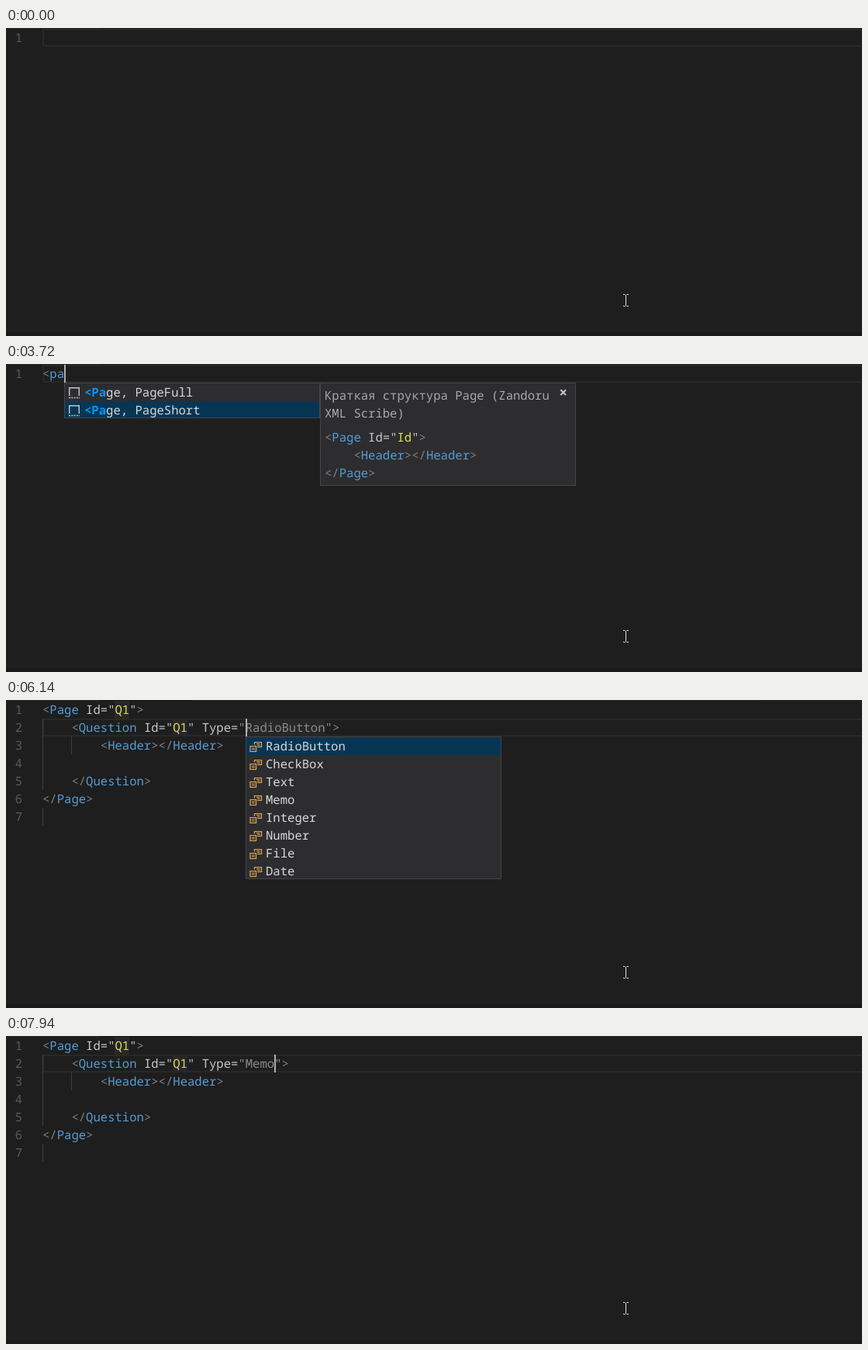
Write an HTML page that moves like this. It is 1104x397 px and loops after 8000 ms.

```html
<!DOCTYPE html>
<html lang="ru">
<head>
<meta charset="utf-8">
<title>XML completion</title>
<style>
html, body { margin: 0; width: 100%; height: 100%; overflow: hidden; background: #1e1e1e; }
body {
  position: relative;
  font: 15.58px/23px "Noto Sans Mono", monospace;
  text-rendering: geometricPrecision;
  font-variant-ligatures: none;
  color: #c8c8c8;
}
#stage div, #stage svg, .edge, #mouse { position: absolute; white-space: pre; box-sizing: border-box; }
.edge { left: 0; width: 100%; }
.top { top: 0; height: 1px; background: linear-gradient(90deg, #262626 120px, #1a1a1a 120px 240px, #262626 240px 975px, #222 975px); }
.bottom { bottom: 0; height: 5px; background: #1d181b; }
.number { left: 0; width: 21px; text-align: right; color: #5a5a5a; }
.current { right: -4px; height: 23px; border: 2px solid #282828; }
.guide { width: 1px; background: #404040; }
.caret { width: 2px; height: 23px; background: #aeafad; }
.second { background: #7d8388; }
.word { background: #3a3d41; }
.chosen { background: #29506f; }
.hint { background: #272727; }
.angle, .plain { color: #808080; }
.tag { color: #569cd6; }
.value { color: #dede59; }
.plain { color: #8c8c8c; }
.box { background: #2d2d30; border: 1px solid #454545; overflow: hidden; width: 330px; }
.item { left: 0; width: 100%; height: 23px; padding-left: 25px; color: #d8d8d8; }
.item b { color: #0097fb; }
.active { background: #073655; }
.info { color: #a9a9a9; left: 5px; }
.sample { left: 5px; }
svg { fill: none; }
#mouse { left: 795px; top: 342px; stroke: #e4e4e4; }
</style>
</head>
<body>
<div class="edge top"></div>
<div class="edge bottom"></div>
<div id="stage"></div>
<svg id="mouse" width="9" height="18"><path d="M1 1.5h2.5M5.5 1.5H8M1 16.5h2.5M5.5 16.5H8M4.5 2v14"/></svg>
<script>
const LOOP = 8000, LEFT = 47, TOP = 1, ROW = 23, ADVANCE = 9.348;
const colX = col => LEFT + col * ADVANCE;
const rowY = row => TOP + row * ROW;

const div = (name, x, y, body = '', style = '') =>
  `<div class="${name}" style="left:${x}px;top:${y}px;${style}">${body}</div>`;
const span = (name, text) => `<span class="${name}">${text}</span>`;

const colorize = line => line.replace(/</g, '&lt;').replace(
  /&lt;(\/?)(\w+)|(\w+)="([^"]*)"|>/g,
  (all, slash, tag, attr, value) => {
    if (tag) return span('angle', '&lt;' + slash) + span('tag', tag);
    if (attr === 'Id') return `Id="${span('value', value)}"`;
    if (attr) return `${attr}=${span('plain', `"${value}"`)}`;
    return span('angle', '&gt;');
  });

const pageLines = (id, type = 'RadioButton') => [
  `<Page Id="${id}">`,
  `    <Question Id="${id}" Type="${type}">`,
  '        <Header></Header>',
  '',
  '    </Question>',
  '</Page>',
  ''
];

const snippetIcon = `<svg style="left:4px;top:4px" width="16" height="16" stroke="#c5c5c5" stroke-width="1.4">
  <path d="M1.7 12V1.7H14.3V12"/><path d="M1 14.5H15" stroke-dasharray="2 1.3"/></svg>`;
const enumIcon = `<svg style="left:4px;top:5px" width="17" height="15" stroke="#e8ab53" stroke-width="1.2">
  <path d="M6.5 4.5V1.5H15.5V7.5H10M1 6.5H8.5V13.5H1ZM9 3.5H13.5M10 5.5H13.5M3 9H6.7M3 11H6.7"/></svg>`;
const closeIcon = `<svg style="left:308px;top:7px" width="10" height="10" stroke="#c5c5c5" stroke-width="2">
  <path d="M1.3 1.3L8 8M8 1.3L1.3 8"/></svg>`;

const listBox = (x, y, items, active, icon) => div('box', x, y,
  items.map((item, i) =>
    `<div class="item${i === active ? ' active' : ''}" style="top:${i * ROW}px">${icon}${item}</div>`).join(''),
  `height:${items.length * ROW}px`);

const samples = [
  ['Полная', [
    '<Page Id="Id">', '    <Question Id="Id"', 'Type="RadioButton">',
    '        <Header></Header>', '', '    </Question>', '</Page>'
  ]],
  ['Краткая', ['<Page Id="Id">', '    <Header></Header>', '</Page>']]
];

function snippetPopup(active) {
  const names = ['PageFull', 'PageShort'].map(name => `<b>&lt;Pa</b>ge, ${name}`);
  const [kind, lines] = samples[active];
  const info = `${kind} структура Page (Zandoru\nXML Scribe)`;
  return listBox(75, 24, names, active, snippetIcon) + div('box', 405, 24,
    div('info', 5, 4, info) + div('sample', 5, 58, lines.map(colorize).join('\n')) + closeIcon,
    `height:${64 + lines.length * ROW}px`);
}

const types = ['RadioButton', 'CheckBox', 'Text', 'Memo', 'Integer', 'Number', 'File', 'Date'];
const typePopup = active => listBox(309, 47, types, active, enumIcon);

const mark = (name, row, col, length) =>
  div(name, colX(col), rowY(row), '', `width:${length * ADVANCE}px;height:${ROW}px`);

const idMarks = (name, length) => mark(name, 0, 10, length) + mark(name, 1, 18, length);
const chosenMarks = mark('word', 0, 6, 2) + mark('word', 1, 14, 2) + idMarks('chosen', 2) + mark('hint', 1, 28, 11);

const typed = (text, popup = '') => ({ lines: [text], current: 0, carets: [[0, text.length]], popup });
const selected = { lines: pageLines('Id'), carets: [[0, 12], [1, 20]], marks: chosenMarks };
const naming = id => ({
  lines: pageLines(id), current: 0,
  carets: [[0, 10 + id.length], [1, 18 + id.length]],
  marks: idMarks('hint', id.length) + mark('hint', 1, 27 + id.length - 1, 11)
});
const choosing = active => ({
  lines: pageLines('Q1'), current: 1, carets: [[1, 28]],
  marks: idMarks('hint', 2) + mark('hint', 1, 28, 11), popup: typePopup(active)
});
const finished = {
  lines: pageLines('Q1', 'Memo'), current: 1, carets: [[1, 32]], marks: idMarks('hint', 2)
};
const blink = state => ({ ...state, carets: [] });

const full = typed('<pa', snippetPopup(0));
const brief = typed('<pa', snippetPopup(1));

const steps = [
  [0, blink(typed(''))],
  [400, typed('')],
  [1000, typed('<')],
  [1440, blink(typed('<'))],
  [1710, typed('<p')],
  [1830, full],
  [2270, blink(full)],
  [2700, full],
  [2820, brief],
  [3280, blink(brief)],
  [3720, brief],
  [4180, full],
  [4740, blink(full)],
  [4880, selected],
  [5310, blink(selected)],
  [5590, naming('Q')],
  [5870, naming('Q1')],
  [6140, choosing(0)],
  [6700, blink(choosing(0))],
  [7130, choosing(1)],
  [7260, choosing(2)],
  [7530, choosing(3)],
  [7680, blink(choosing(3))],
  [7940, finished]
];

function guides(lines) {
  if (lines.length === 1) return '';
  const guide = (col, row, count) => div('guide', Math.floor(colX(col)), rowY(row), '', `height:${count * ROW}px`);
  return guide(0, 1, 4) + guide(4, 2, 1) + guide(0, 6, 1);
}

function view({ lines, current, carets, marks = '', popup = '' }) {
  const highlight = current === undefined ? '' : div('current', LEFT, rowY(current));
  const text = lines.map((line, i) =>
    div('number', 0, rowY(i), i + 1) + div('line', LEFT, rowY(i), colorize(line))).join('');
  const cursors = carets.map(([row, col], i) =>
    div(i ? 'caret second' : 'caret', Math.round(colX(col)), rowY(row))).join('');
  return highlight + marks + guides(lines) + text + popup + cursors;
}

const stage = document.getElementById('stage');
const start = performance.now();
let shown;

function draw() {
  const time = (performance.now() - start) % LOOP;
  const state = steps.findLast(([from]) => from <= time)[1];
  if (state !== shown) stage.innerHTML = view(shown = state);
  requestAnimationFrame(draw);
}
draw();
</script>
</body>
</html>
```
